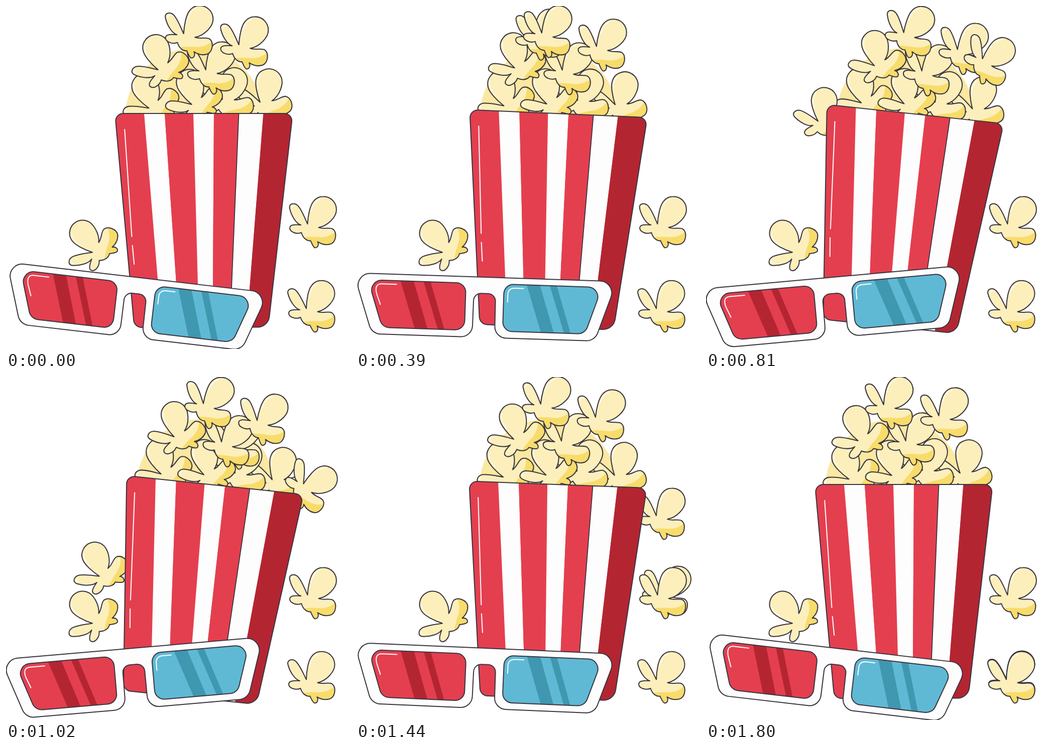
Animation of 685 by 683 pixels, one loop 1830 ms. Source, as an HTML page with a canvas:

```html
<!DOCTYPE html>
<html lang="en">
<head>
<meta charset="utf-8">
<title>Popcorn and 3D glasses</title>
<style>
html, body { margin: 0; width: 100%; height: 100%; overflow: hidden; background: #fff; }
canvas { display: block; }
</style>
</head>
<body>
<canvas id="stage" width="685" height="683"></canvas>
<script>
const ctx = document.getElementById('stage').getContext('2d');
const LOOP = 1830, SWING = 1800, STEP = 30;
const INK = '#3a3541', WHITE = '#fdfdfd', RED = '#e43f4f', DARK_RED = '#b42532';
const BLUE = '#5fb9d5', DARK_BLUE = '#4097b0';
const CORN = '#fcefbb', GOLD = '#f8dc6b', PILE = '#fbe8a2';

// One popcorn kernel around its own centre
const kernel = new Path2D(`M-11 3 C-10 -14 -6 -34 1 -42 C6 -48 13 -51 19 -51
  C34 -52 46 -40 46 -25 C46 -10 28 7 11 10 C22 14 32 9 39 13 C48 20 45 37 36 42
  C28 45 18 44 9 38 C12 44 9 50 4 50 C0 49 -2 42 -5 36 C-12 37 -20 31 -23 20
  C-32 24 -46 19 -46 11 C-46 4 -36 4 -24 5 C-34 2 -43 -14 -46 -27
  C-49 -38 -36 -40 -29 -32 C-21 -22 -17 -10 -11 3Z`);
const shade = new Path2D('M48 13 C40 24 28 29 14 29 C4 28 -6 28 -16 29 L-24 60 L60 60Z');
const shine = new Path2D('M-4 -22 C-2 -33 4 -43 13 -46 M-42 -28 Q-42 -34 -36 -33');

// x, y, turn in degrees
const pile = {
  right: [515, 184, -24], inner: [441, 180, -15], left: [288, 192, -58],
  middle: [374, 185, -53], front: [409, 124, 0], upLeft: [307, 116, -53],
  upRight: [475, 74, 0], top: [365, 52, 0]
};
const resting = [[172, 479, -75], [611.5, 431, 0], [609, 599, -2]];

// time, x, y, turn; each flight ends on a resting kernel
const flights = [
  [[300, 374, 54, 0], [540, 326, 86, 0], [810, 231, 221, -31], [1215, ...resting[0]]],
  [[600, 503, 79, 0], [810, 562, 106, 20], [1200, 628, 318, 30], [1440, 618, 426, 6], [1530, ...resting[1]]],
  [[930, 442, 125, 0], [1200, 534, 179, 0], [1440, 609, 273, 0], [1815, ...resting[2]]]
];

// Smooth curve through timed keys, at rest at both ends
function along(keys, t) {
  const last = keys.length - 1;
  if (t < keys[0][0] || t > keys[last][0]) return null;
  let i = 0;
  while (i < last - 1 && t >= keys[i + 1][0]) i++;
  const a = keys[i], b = keys[i + 1], span = b[0] - a[0];
  const u = (t - a[0]) / span, v = 1 - u;
  const speed = (k, c) => k === 0 || k === last ? 0
    : (keys[k + 1][c] - keys[k - 1][c]) / (keys[k + 1][0] - keys[k - 1][0]);
  return [1, 2, 3].map(c =>
    a[c] * (1 + 2 * u) * v * v + b[c] * u * u * (3 - 2 * u) +
    span * (speed(i, c) * u * v * v - speed(i + 1, c) * u * u * v));
}

// Draw with the origin moved to x, y and turned
function at(x, y, deg, paint) {
  ctx.save();
  ctx.translate(x, y);
  ctx.rotate(deg * Math.PI / 180);
  paint();
  ctx.restore();
}

function inside(path, paint) {
  ctx.save();
  ctx.clip(path);
  paint();
  ctx.restore();
}

function ink(path, color = INK, width = 2) {
  ctx.strokeStyle = color;
  ctx.lineWidth = width;
  ctx.stroke(path);
}

function fill(path, color) {
  ctx.fillStyle = color;
  ctx.fill(path);
}

function corn(place, scale = 1.01) {
  if (!place) return;
  at(...place, () => {
    ctx.scale(scale, scale);
    fill(kernel, CORN);
    inside(kernel, () => fill(shade, GOLD));
    ink(shine, '#fffdf4', 1.8);
    ink(kernel);
  });
}

// Each point: x, y, corner radius
function rounded(points) {
  const path = new Path2D(), first = points[0], end = points[points.length - 1];
  path.moveTo((first[0] + end[0]) / 2, (first[1] + end[1]) / 2);
  points.forEach(([x, y, r], i) => {
    const next = points[(i + 1) % points.length];
    path.arcTo(x, y, next[0], next[1], r);
  });
  path.closePath();
  return path;
}

// Slanted strip between two heights
function strip(top, bottom, a, b, c, d) {
  return new Path2D(`M${a} ${top} H${b} L${d} ${bottom} H${c}Z`);
}

const bucket = rounded([[217, 214, 15], [571, 214, 15], [522, 639.5, 24], [255.5, 640, 16]]);
const edges = [[275, 310], [316, 345], [373, 384.3], [414, 411.5], [463.5, 445.7], [512.5, 479], [590, 560]];
const bands = edges.slice(1).map(([b, d], i) => strip(214, 640, edges[i][0], b, edges[i][1], d));
const bandColors = [WHITE, RED, WHITE, RED, WHITE, DARK_RED];
const seam = new Path2D('M463.5 214 L445.8 639');
const gleam = new Path2D('M236.3 246 L250.5 459 M251.7 477 L255.2 514');

function drawBucket() {
  fill(bucket, RED);
  inside(bucket, () => bands.forEach((band, i) => fill(band, bandColors[i])));
  ink(seam, INK, 1.8);
  ink(gleam, WHITE);
  ink(bucket);
}

// The glasses are built upright from one half and its mirror image
const mirror = points => points.map(([x, y, r]) => [-x, y, r]);
const halfRim = [[262, -58, 24], [222, 62, 24], [22.4, 62, 23], [21.7, -25.5, 15]];
const halfLens = [[38, -45.3, 19], [233, -45.3, 20], [202, 48.5, 20], [38, 48.5, 19]];
const rim = rounded([...halfRim, ...mirror(halfRim).reverse()]);
const lenses = [
  { shape: rounded(mirror(halfLens)), color: RED, dark: DARK_RED, x: -171,
    shine: new Path2D('M-207 3 L-215 -18 Q-221 -38 -205 -38 H-176') },
  { shape: rounded(halfLens), color: BLUE, dark: DARK_BLUE, x: 80.5,
    shine: new Path2D('M46 -10 V-24 Q46 -38 60 -38 H77') }
];

function drawGlasses() {
  fill(rim, WHITE);
  ink(rim);
  for (const { shape, color, dark, x, shine } of lenses) {
    fill(shape, color);
    inside(shape, () => {
      for (const [left, width] of [[x, 26.5], [x + 46, 14]]) {
        const foot = left + 37;
        fill(strip(-53, 58, left, left + width, foot, foot + width - 1), dark);
      }
    });
    ink(shine, WHITE);
    ink(shape);
  }
}

function draw(t) {
  const sway = (1 - Math.cos(2 * Math.PI * t / SWING)) / 2;
  const withBucket = paint => at(394, 427, 6.3 * sway, () => {
    ctx.translate(-394, -427);
    paint();
  });
  const put = (...names) => withBucket(() => names.forEach(n => corn(pile[n], 1.03)));
  const [toLeft, toRight, toBottom] = flights.map(keys => along(keys, t));

  ctx.fillStyle = '#fff';
  ctx.fillRect(0, 0, 685, 683);
  ctx.lineCap = ctx.lineJoin = 'round';

  withBucket(() => {
    ctx.fillStyle = PILE;
    ctx.beginPath();
    ctx.ellipse(375, 218, 137, 134, 0, Math.PI, 2 * Math.PI);
    ctx.fill();
  });
  put('right', 'inner', 'left', 'middle');
  corn(toBottom);
  put('front', 'upLeft');
  corn(toLeft);
  put('upRight');
  corn(toRight);
  put('top');
  withBucket(drawBucket);

  resting.forEach(place => corn(place));
  at(255.5, 598, 6.65 - 12.1 * sway, drawGlasses);
}

const start = performance.now();
function tick() {
  const t = (performance.now() - start) % LOOP;
  draw(Math.floor(t / STEP) * STEP);
  requestAnimationFrame(tick);
}
tick();
</script>
</body>
</html>
```
